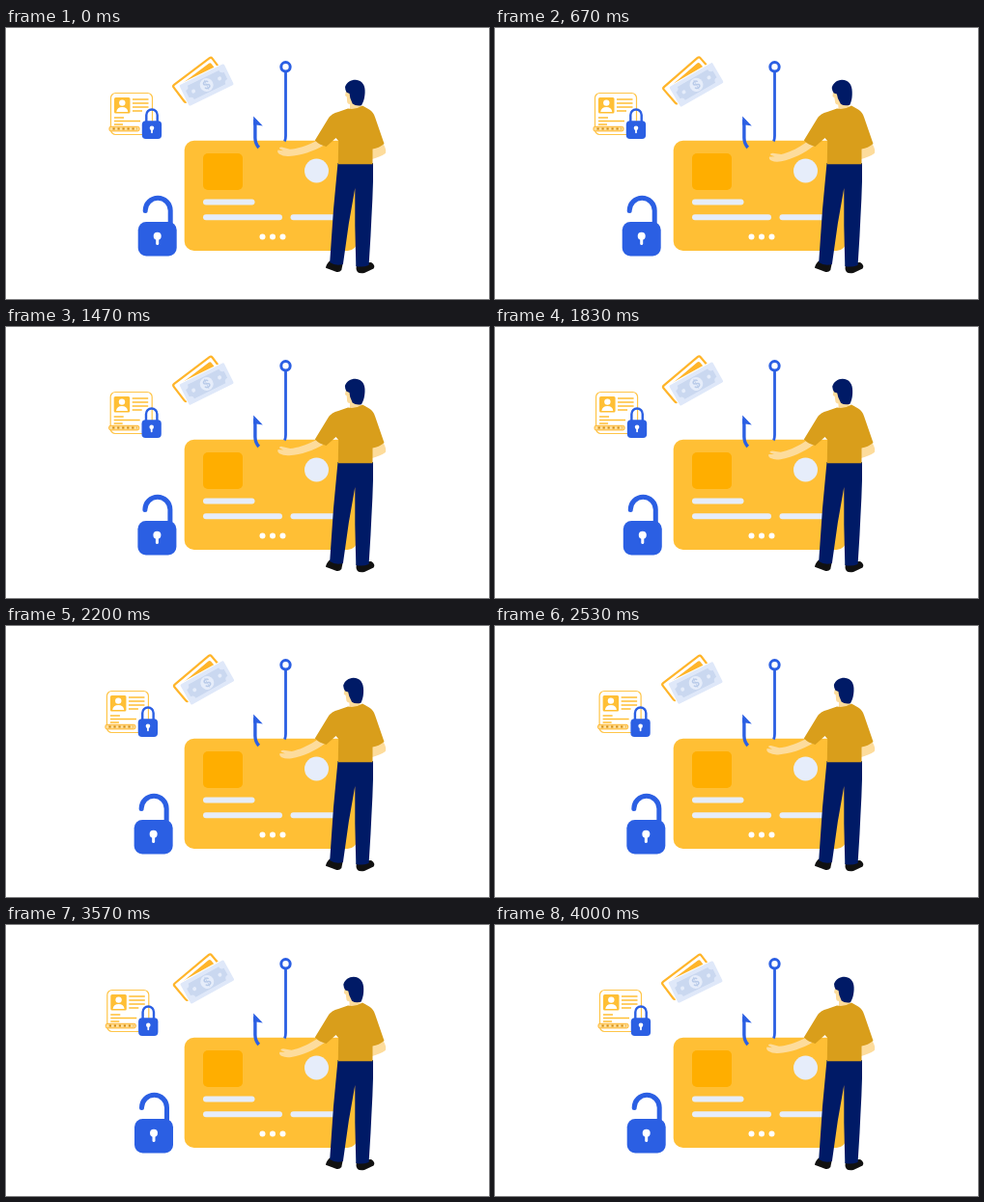
An HTML page for the animation above (4030 ms loop, 500x281 px).

```html
<!DOCTYPE html>
<html lang="en">
<head>
<meta charset="utf-8">
<title>Card phishing</title>
<style>
  html, body { margin: 0; width: 100%; height: 100%; overflow: hidden; background: #fff; }
  svg { display: block; width: 100vw; height: 100vh; }
  .blue { fill: #2b5fe3; }
  .line { fill: none; stroke: #2b5fe3; }
  .gold { fill: #ffbf35; }
  .pale { fill: #e6edfa; }
  .skin { fill: #fddc9c; }
  .navy { fill: #001a66; }
  .shirt { fill: #d99e1b; }
</style>
</head>
<body>
<svg viewBox="0 0 500 281">
  <!-- bank card -->
  <rect class="gold" x="184.7" y="116.8" width="179" height="114.2" rx="10"/>
  <rect x="204" y="130" width="41" height="38" rx="5" fill="#ffae00"/>
  <circle class="pale" cx="321.5" cy="148" r="12.5"/>
  <g class="pale">
    <rect x="204" y="177.5" width="53.5" height="6" rx="3"/>
    <rect x="204" y="193.3" width="82" height="6" rx="3"/>
    <rect x="294.5" y="193.3" width="52" height="6" rx="3"/>
  </g>
  <g fill="#fff">
    <circle cx="265.5" cy="216.5" r="3"/>
    <circle cx="276" cy="216.5" r="3"/>
    <circle cx="286.5" cy="216.5" r="3"/>
  </g>

  <!-- hook -->
  <circle class="line" cx="289.5" cy="40.3" r="4.7" stroke-width="3"/>
  <path class="line" d="M289.5 45V112Q289.5 115 288.5 117.5" stroke-width="2.8"/>
  <path class="line" d="M257.9 95V114Q258 120 261.8 124" stroke-width="3.4"/>
  <path class="blue" d="M256.2 91.5L265.8 101.5L259.5 100.5H256.2Z"/>

  <!-- banknotes -->
  <g id="money">
    <g transform="translate(199 53.8) rotate(-37)">
      <rect x="-25" y="-11" width="50" height="22" rx="2" fill="#fff" stroke="#ffb52a" stroke-width="2.2"/>
      <rect x="-20" y="-7" width="41" height="14" rx="2" fill="#ffb52a"/>
    </g>
    <g transform="translate(207.6 59) rotate(-26)">
      <rect x="-26.7" y="-13" width="53.4" height="26" rx="1.5" fill="#fff"/>
      <rect x="-25.7" y="-12" width="51.4" height="24" rx="1.5" fill="#dfe8f9"/>
      <path d="M-18 -8H18Q18 -4 22 -4V4Q18 4 18 8H-18Q-18 4 -22 4V-4Q-18 -4 -18 -8Z" fill="#cad8f0"/>
      <circle r="7" fill="#e6edfa"/>
      <circle cx="-15" r="2" fill="#e6edfa"/>
      <circle cx="15" r="2" fill="#e6edfa"/>
      <text y="4.3" text-anchor="middle" font-family="Inter, Arial, sans-serif" font-size="12" font-weight="600" fill="#b9cbe9">$</text>
    </g>
  </g>

  <g id="locks">
    <!-- identity card -->
    <rect x="108.5" y="67.5" width="43" height="43" rx="5" fill="#fff" stroke="#ffc548" stroke-width="1.2"/>
    <rect class="gold" x="112" y="72" width="16.5" height="16.5" rx="1.5"/>
    <circle cx="120.3" cy="77.6" r="3.2" fill="#fff"/>
    <path d="M114.3 87Q115 82 120.3 82T126.3 87Z" fill="#fff"/>
    <path d="M131 74H147.5M131 78H147.5M131 82H147.5M131 86H141M112 93H122M112 96.5H139M112 100H121" stroke="#ffbf35" stroke-width="1.7"/>
    <rect x="107" y="102.3" width="31" height="4.6" rx="1.6" fill="#ffdf9a" stroke="#ffb52a"/>
    <path d="M110.5 104.6H136" stroke="#d08a10" stroke-width="2" stroke-dasharray="2.2 2.8"/>
    <path class="line" d="M145.3 98V90.2A5.7 5.7 0 0 1 156.7 90.2V98" stroke-width="2.4"/>
    <rect class="blue" x="140.8" y="96.3" width="20.3" height="18.7" rx="4"/>
    <circle cx="151" cy="103.8" r="2.3" fill="#fff"/>
    <path d="M151 104V108.3" stroke="#fff" stroke-width="1.8" stroke-linecap="round"/>

    <!-- open padlock -->
    <path class="line" d="M144.2 189.5V189.3A13 13 0 0 1 170.2 189.3V204" stroke-width="5" stroke-linecap="round"/>
    <rect class="blue" x="136.7" y="201" width="40" height="35.6" rx="8.5"/>
    <circle cx="156.7" cy="215.8" r="4" fill="#fff"/>
    <path d="M156.7 216V223.4" stroke="#fff" stroke-width="3" stroke-linecap="round"/>
  </g>

  <!-- man -->
  <path d="M335 241.5L348.5 245L347.3 251Q345 254 341 252.5L331 248.7Q331 246 335 241.5Z" fill="#111"/>
  <path d="M363 244L378 243Q383 246 380.5 249.5L371 254Q362.5 255.5 362.5 249Z" fill="#111"/>
  <path class="navy" d="M343.5 140H380C380.6 165 378.5 190 377.5 215L375.6 246Q369 248.5 362.3 247L361.3 205V166L354.8 203L348.9 245Q341 247 335.2 243L339 188Z"/>
  <path class="skin" d="M378 123L390.5 120Q394.2 126 392.8 130Q387 134 378 136.3Z"/>
  <path id="arm" class="skin" d="M338 108L319.5 118C309 123 302 125 294 125.8L285.5 123.5Q282.5 123.2 283 125L287 127.2L281.5 126.5Q280.3 129 283 130.8Q287 133.3 293 133C306 132 317 128.5 330 121Z"/>
  <g id="head">
    <path class="skin" d="M352.2 64L351 70L352.8 71.5L353.2 77Q353.5 79 356 79V90H367V74L360 62Z"/>
    <path class="navy" d="M351 61C353 56 357 53.7 362 53.8C369 54.3 372.2 60 371.6 67C371.2 74 369.8 77 368 80.3Q362 81.3 358.7 78.5L356.3 72.5L355.6 68L352.6 66.8Q351 64 351 61Z"/>
  </g>
  <path class="shirt" d="M354 83.5Q362 85 369 80.5L376 84.5Q380.5 87 382.2 93L391.5 120Q386 124.5 379.5 125.5V141.3H343.8L344.2 117L341.5 114L331.5 123Q324 121 319.8 116.5L333.5 94Q337 88.5 344 87Z"/>
</svg>
<script>
  const LOOP = 4030, STEPS = 120, CYCLE = 40, TURN = 20, RISE = 18;
  const byId = id => document.getElementById(id);
  const [locks, money, arm, head] = ["locks", "money", "arm", "head"].map(byId);
  const ease = x => x >= 1 ? 1 : x * x * (3 - 2 * x);
  const set = (el, value) => el.setAttribute("transform", value);

  // 0 at rest, 1 at the far end of the sway
  function sway(ms) {
    const k = Math.floor((ms % LOOP) / LOOP * STEPS + 0.05) % CYCLE;
    return k < TURN ? ease(k / TURN) : 1 - ease((k - TURN) / RISE);
  }

  function draw(now) {
    const s = sway(now);
    set(locks, `translate(${-5 * s} 0)`);
    set(money, `translate(${0.7 * s} 0) rotate(${-4 * s} 206 56)`);
    set(arm, `rotate(${-8 * s} 332 112)`);
    set(head, `rotate(${-5 * s} 361 88)`);
  }

  let start;
  function tick(now) {
    start ??= now;
    draw(now - start);
    requestAnimationFrame(tick);
  }
  draw(0);
  requestAnimationFrame(tick);
</script>
</body>
</html>
```
